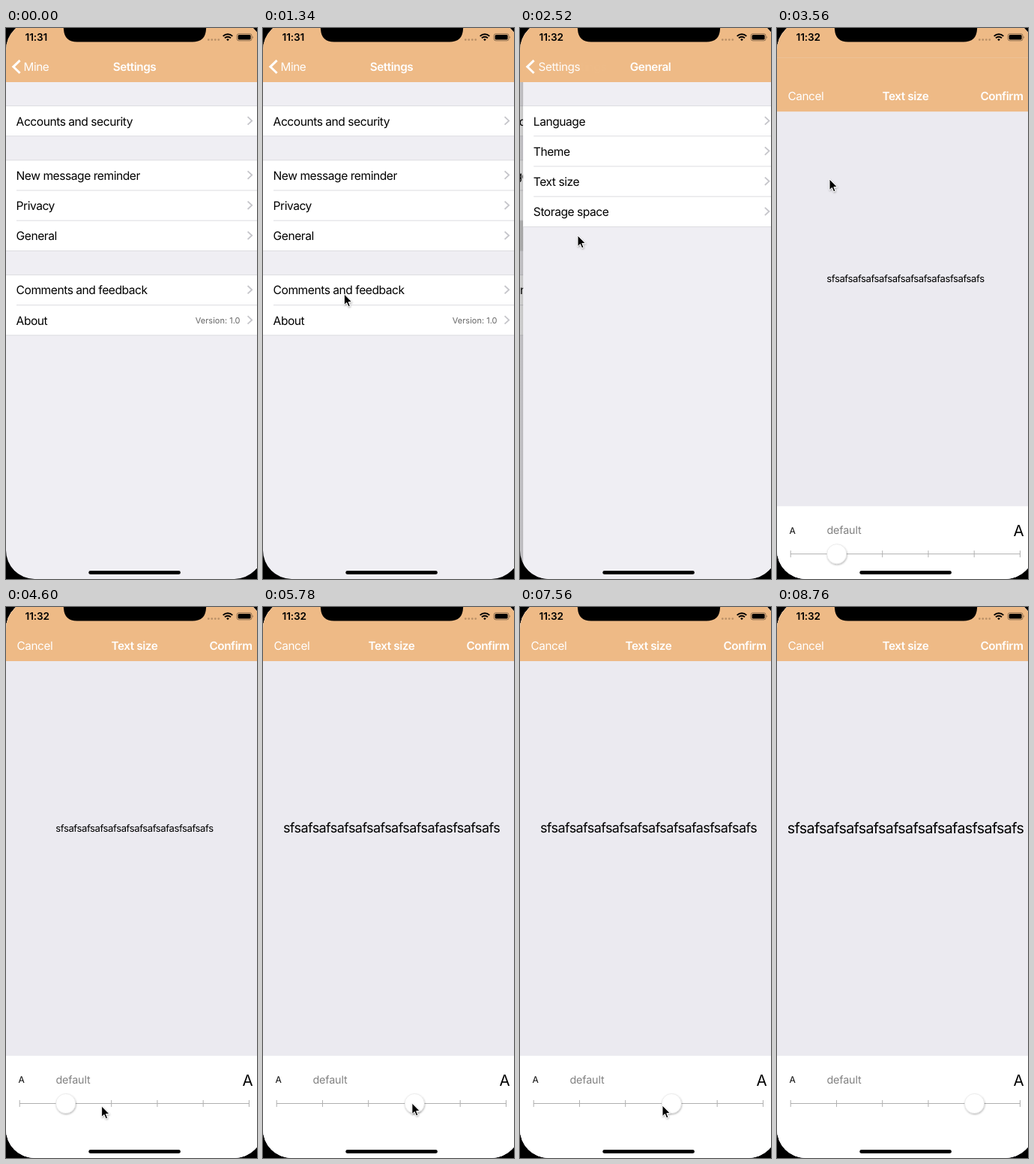
Recreate the animation shown at these times as an HTML page. Size 335 by 733 pixels, loop 9.15 s.

```html
<!DOCTYPE html>
<html lang="en">
<head>
<meta charset="utf-8">
<title>Text size setting</title>
<style>
  html, body { margin: 0; width: 100%; height: 100%; overflow: hidden; background: #000; }
  svg { display: block; width: 100%; height: 100%; }
  text { font-family: Inter, Roboto, "Liberation Sans", sans-serif; text-rendering: geometricPrecision; white-space: pre; }
  .row { font-size: 15.6px; letter-spacing: -.03em; }
  .nav { font-size: 15.3px; letter-spacing: -.027em; fill: #fff; }
  .title { font-weight: 600; text-anchor: middle; }
  .bold { font-weight: 600; }
  .note { font-size: 11px; fill: #666; }
  .chevron { fill: none; stroke: #c5c5ca; stroke-width: 1.8; }
  .line { stroke: #dcdce0; stroke-width: 1; }
  .scale { stroke: #b0b0b0; stroke-width: 1; fill: none; }
</style>
</head>
<body>
<svg viewBox="0 0 335 733">
  <defs>
    <clipPath id="screen"><rect y="-9" width="343" height="742" rx="38"/></clipPath>
    <linearGradient id="edge"><stop stop-opacity="0"/><stop offset="1" stop-opacity=".16"/></linearGradient>
    <filter id="soft" x="-50%" y="-50%" width="200%" height="200%">
      <feDropShadow dx="0.5" dy="1.2" stdDeviation="1.1" flood-opacity=".32"/>
    </filter>
  </defs>

  <g clip-path="url(#screen)">
    <rect width="343" height="733" fill="#efeef3"/>
    <g id="settings"></g>
    <rect id="dim" width="343" height="733"/>
    <g id="general">
      <rect x="-8" width="8" height="733" fill="url(#edge)"/>
      <rect width="343" height="733" fill="#efeef3"/>
    </g>

    <rect y="-9" width="343" height="81" fill="#eeba86"/>
    <path d="M18.6 43.2L9.8 51.6L18.6 60" fill="none" stroke="#fff" stroke-width="3"/>
    <text id="oldBack" class="nav" x="23.5" y="57">Mine</text>
    <text id="oldTitle" class="nav title" x="171.5" y="57">Settings</text>
    <text id="newBack" class="nav" x="23.5" y="57">Settings</text>
    <text id="newTitle" class="nav title" x="171.5" y="57">General</text>

    <g id="modal">
      <rect width="343" height="745" fill="#ebeaf0"/>
      <rect width="343" height="72" fill="#eeba86"/>
      <text class="nav" x="14.5" y="57">Cancel</text>
      <text class="nav title" x="171.5" y="57">Text size</text>
      <text class="nav bold" x="328.5" y="57" text-anchor="end">Confirm</text>
      <text id="sample" x="171.5" text-anchor="middle" letter-spacing="-.032em">sfsafsafsafsafsafsafsafsafasfsafsafs</text>
      <rect y="597" width="343" height="150" fill="#fff"/>
      <text x="16.6" y="633.4" font-size="12">A</text>
      <text x="66.5" y="634" font-size="14.3" letter-spacing="-.01em" fill="#808080">default</text>
      <text x="315.4" y="636.6" font-size="20.5">A</text>
      <path id="scale" class="scale"/>
      <circle id="thumb" r="13" cy="660.5" fill="#fff" stroke="#ddd" stroke-width=".5" filter="url(#soft)"/>
    </g>

    <path d="M75.5 -1Q77 -1 77 2Q78 18.5 95 18.5H249Q266 18.5 267 2Q267 -1 268.5 -1Z"/>
    <text id="clock" x="25.6" y="17.2" font-size="13.6" class="bold" letter-spacing="-.01em"></text>
    <path d="M270.3 15.6H286" stroke="#b98f66" stroke-width="2.8" stroke-linecap="round" stroke-dasharray="0 4.5"/>
    <g fill="none" stroke="#000" stroke-width="2">
      <path d="M289.7 10.9a9 9 0 0 1 12.6 0M292 13.4a5.6 5.6 0 0 1 8 0"/>
      <path d="M294.2 15.2a2.5 2.5 0 0 1 3.6 0L296 17.2z" fill="#000" stroke="none"/>
      <rect x="308.2" y="7.7" width="19.8" height="9.2" rx="2.6" stroke-width=".8" stroke-opacity=".5"/>
    </g>
    <rect x="309.6" y="9.1" width="17" height="6.4" rx="1.5"/>
    <path d="M329 10.7q1.6 1.6 0 3.2z" opacity=".5"/>
    <rect x="110.3" y="722" width="122.6" height="4.8" rx="2.4"/>
  </g>

  <path id="cursor" d="M0 0V14.6L3.4 11.5L5.6 16.8L8 15.8L5.8 10.6H10.4Z" stroke="#fff" stroke-width="1" filter="url(#soft)"/>
</svg>

<script>
const LOOP = 9150, WIDTH = 343, HEIGHT = 742, ROW = 40.2, TICK = 61.25;
const $ = id => document.getElementById(id);

const bursts = [
  [150, 5, 750], [1050, 7, 1930], [2220, 7, 3120], [3410, 4, 3860], [4150, 8, 5190],
  [5330, 8, 6360], [6510, 7, 7410], [7560, 3, 7860], [8310, 1, 8310], [8610, 2, 8760]
];
const updates = [0];
for (const [from, count, to] of bursts)
  for (let i = 0; i < count; i++)
    updates.push(Math.round(from + (to - from) * i / Math.max(1, count - 1)));

// Pointer path: time, x, y
const pointer = [
  [0, 300, 750], [150, 276, 713], [750, 79, 391], [900, 79, 391], [1050, 100, 372],
  [1350, 117, 335], [1800, 79, 280], [1930, 77, 276], [2600, 77, 276], [3120, 70, 201],
  [4000, 70, 201], [4600, 128, 667], [4750, 135, 668], [5190, 139, 661], [5330, 145, 660],
  [5780, 200, 660], [6360, 262, 661], [6510, 240, 663], [6810, 99.5, 663], [7110, 84, 665],
  [7260, 90, 664], [7410, 140, 663], [7560, 190, 663], [7710, 245, 664], [7860, 272, 666],
  [8300, 272, 666], [8310, 273, 667], [8600, 273, 667], [8610, 286, 712], [8760, 300, 750]
];

function pointerAt(t) {
  const i = pointer.findIndex(k => k[0] > t);
  if (i < 0) return pointer[pointer.length - 1].slice(1);
  const [t0, x0, y0] = pointer[i - 1], [t1, x1, y1] = pointer[i];
  const k = (t - t0) / (t1 - t0);
  return [x0 + (x1 - x0) * k, y0 + (y1 - y0) * k];
}

// Critically damped spring from 0 to 1
function spring(ms) {
  const x = Math.max(0, ms) * 0.0182;
  return 1 - (1 + x) * Math.exp(-x);
}

const rule = (x, y) => `<path class="line" d="M${x} ${y}H${WIDTH}"/>`;

function section(top, labels, picked) {
  const height = labels.length * ROW;
  let out = `<rect y="${top}" width="${WIDTH}" height="${height}" fill="#fff"/>`;
  labels.forEach((label, i) => {
    const y = top + i * ROW;
    if (label === picked)
      out += `<rect class="picked" y="${y}" width="${WIDTH}" height="${ROW}" fill="#d4d4d4"/>`;
    out += rule(i ? 14 : 0, y) + `<text class="row" x="13.6" y="${y + 26}">${label}</text>
      <path class="chevron" d="M322.6 ${y + 14.6}l5.6 5.2l-5.6 5.2"/>`;
  });
  return out + rule(0, top + height);
}

$("settings").innerHTML =
  section(103.6, ["Accounts and security"]) +
  section(175.8, ["New message reminder", "Privacy", "General"], "General") +
  section(328.4, ["Comments and feedback", "About"]) +
  '<text class="note" x="312.5" y="393" text-anchor="end">Version: 1.0</text>';
$("general").insertAdjacentHTML("beforeend",
  section(103.6, ["Language", "Theme", "Text size", "Storage space"], "Text size"));

let ticks = "M18 660.5H324.5";
for (let i = 0; i < 6; i++) ticks += `M${18.2 + i * TICK} 656v9`;
$("scale").setAttribute("d", ticks);

const pickedGeneral = document.querySelector("#settings .picked");
const pickedSize = document.querySelector("#general .picked");

const move = (el, x, y = 0) => el.setAttribute("transform", `translate(${x.toFixed(2)} ${y.toFixed(2)})`);
const fade = (el, value) => el.setAttribute("opacity", value.toFixed(3));

function draw(now) {
  const clock = now % LOOP;
  const t = updates.filter(u => u <= clock).pop();

  const push = spring(t - 2169), rest = 1 - push;
  move($("settings"), -0.3 * WIDTH * push);
  move($("general"), WIDTH * rest);
  fade($("dim"), 0.1 * push);
  move($("oldBack"), -43 * push);
  fade($("oldBack"), rest);
  move($("oldTitle"), -86 * push);
  fade($("oldTitle"), rest);
  move($("newBack"), 86 * rest);
  fade($("newBack"), push ** 3);
  move($("newTitle"), 208 * rest);
  fade($("newTitle"), push);
  fade(pickedGeneral, t > 2169 ? 1 : 0);
  fade(pickedSize, t > 3303 ? 1 : 0);

  move($("modal"), 0, HEIGHT * (1 - spring(t - 3303)));

  const [x, y] = pointerAt(t);
  move($("cursor"), x, y);

  let stop = Math.round((x - 18) / TICK);
  if (t < 4900) stop = 1;
  if (t > 7860) stop = 4;
  const size = 13.1 + 1.636 * (t < 4900 ? 0 : stop);
  $("sample").setAttribute("font-size", size);
  $("sample").setAttribute("y", 294 + 0.35 * size);
  $("thumb").setAttribute("cx", 18.5 + stop * TICK);

  $("clock").textContent = t < 1500 ? "11:31" : "11:32";
}

const start = performance.now();
function tick() {
  draw(performance.now() - start);
  requestAnimationFrame(tick);
}
tick();
</script>
</body>
</html>
```
